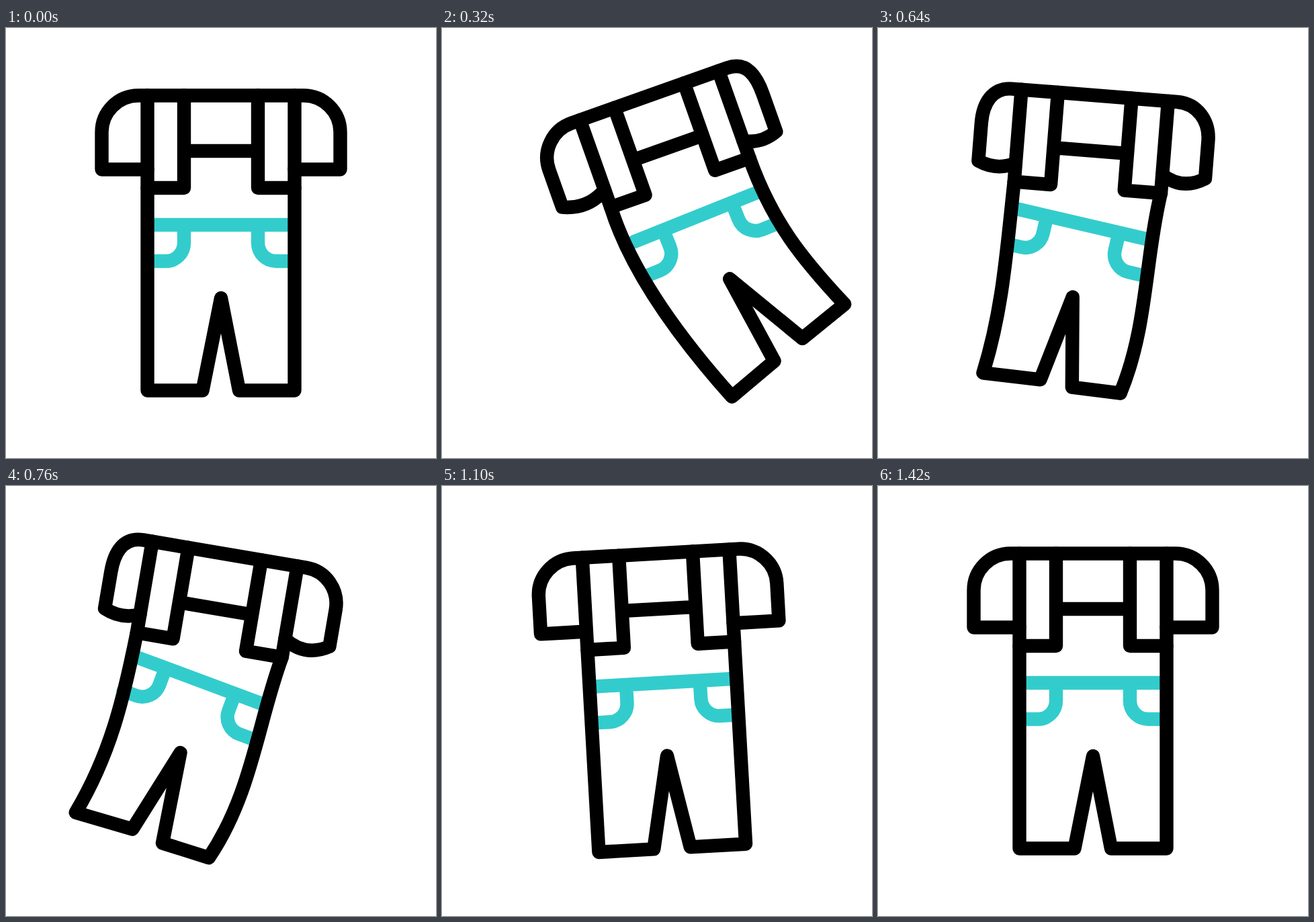
An HTML page that plays this animation: 640x640 px, repeating every 2.4 s.

```html
<!DOCTYPE html>
<html lang="en">
<head>
<meta charset="utf-8">
<title>Overalls</title>
<style>
  html, body { margin: 0; width: 100%; height: 100%; overflow: hidden; background: #fff; }
  svg { display: block; width: 100vw; height: 100vh; }
  path { fill: none; stroke: #000; stroke-width: 20.4; stroke-linecap: round; stroke-linejoin: round; }
  #trim path { stroke: #33cccc; }
</style>
</head>
<body>
<svg viewBox="0 0 640 640">
  <g id="all">
    <g id="trim">
      <path d="M218 293H422M265 293V320A27 27 0 0 1 238 347H218M375 293V320A27 27 0 0 0 402 347H422"/>
    </g>
    <path id="sleeves"/>
    <path d="M265 100.5V238H210.5M375 100.5V238H429.5M265 183H375"/>
    <path id="body"/>
  </g>
</svg>
<script>
const LOOP = 2400, STEP = 20;

// time, swing angle, share of left bend, share of right bend
const KEYS = [
  [0, 0, 0, 0],
  [360, -20.2, 1, 0],
  [742, 9.8, 0, 1],
  [1033, -5.2, 0, 0],
  [1235, 2.5, 0, 0],
  [1420, 0, 0, 0]
];

const $ = id => document.getElementById(id);
const ease = u => u * u * (3 - 2 * u);

function pose(t) {
  const i = KEYS.findIndex(k => k[0] > t);
  if (i < 0) return [0, 0, 0];
  const from = KEYS[i - 1], to = KEYS[i];
  const u = ease((t - from[0]) / (to[0] - from[0]));
  return [1, 2, 3].map(n => from[n] + (to[n] - from[n]) * u);
}

function draw(t) {
  const [angle, a, b] = pose(t);
  const mix = (p, q) => p * a + q * b;
  // resting point plus its offsets in the two bends
  const pt = (x, y, ax = 0, ay = 0, bx = 0, by = 0) =>
    `${(x + mix(ax, bx)).toFixed(2)} ${(y + mix(ay, by)).toFixed(2)} `;

  $('all').setAttribute('transform', `translate(0 ${-2 * a}) rotate(${angle} 320 135)`);
  $('trim').setAttribute('transform',
    `translate(${mix(8, -4.5)} ${a}) rotate(${mix(-2.4, 10.9)} 320 293)`);

  $('body').setAttribute('d',
    'M210.5 100.5V238C' +
    pt(210.5, 339, -4, 0, -3, 0) + pt(210.5, 439, 32, 16, -9, -15) +
    pt(210.5, 539.5, 78.5, 25.5, -45.5, -22.5) +
    'L' + pt(292.5, 539.5, 73.5, -4.6, -40, -12.2) +
    'L' + pt(320, 402, 22.5, -4.5, -16, 1.5) +
    'L' + pt(347, 539.5, 69.5, -23, -47, 1) +
    'L' + pt(429.5, 539.5, 63, -51, -58, 11) +
    'C' + pt(429.5, 439, 25, -34, -10, 7) + pt(429.5, 339, 0, 0, -19.5, 0) +
    '429.5 238V100.5');

  const left = mix(0, 15), right = mix(-18, -1);
  const sagL = mix(14, 8), sagR = mix(10, 14.5);
  const xl = 142.5 + left, xr = 497.5 + right, hem = 210.5 + 3.5 * a;
  $('sleeves').setAttribute('d',
    `M210.5 210.5C${188 + left / 3} ${210.5 + sagL} ${165 + left * 2 / 3} ${210.5 + sagL} ${xl} ${hem}` +
    `V155C${xl} 125 167 100.5 197 100.5H443C473 100.5 ${xr} 125 ${xr} 155V${hem}` +
    `C${475 + right * 2 / 3} ${210.5 + sagR} ${452 + right / 3} ${210.5 + sagR} 429.5 210.5`);
}

const start = performance.now();
function tick() {
  const t = (performance.now() - start) % LOOP;
  draw(Math.floor(t / STEP) * STEP);
  requestAnimationFrame(tick);
}
tick();
</script>
</body>
</html>
```
